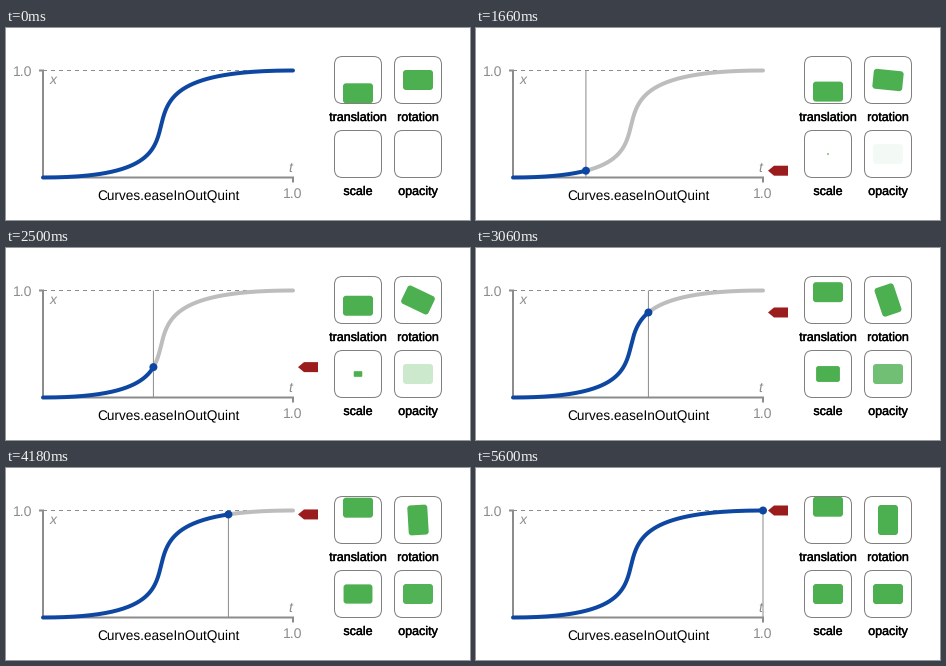
Write a matplotlib script that moves like this. It is 464 px wide and 192 px high and loops after 5620 ms.

```python
import matplotlib.pyplot as plt
import numpy as np
from matplotlib.animation import FuncAnimation
from matplotlib.patches import Circle, FancyBboxPatch, Polygon, Rectangle
from matplotlib.patheffects import Normal, Stroke
from matplotlib.transforms import Affine2D

W, H, DPI = 464, 192, 64
PT = 72 / DPI  # points per pixel
FRAMES, INTERVAL, STEPS = 281, 20, 120

LEFT, RIGHT, TOP, BOTTOM = 37, 287, 42.5, 149.5
BLUE, PALE, AXIS = "#0d47a1", "#bdbdbd", "#8c8c8c"
GREEN, RED = "#4caf50", "#9b1c1c"

plt.rcParams["font.family"] = "Liberation Sans"
plt.rcParams["text.hinting"] = "none"

fig = plt.figure(figsize=(W / DPI, H / DPI), dpi=DPI, facecolor="white")
ax = fig.add_axes([0, 0, 1, 1])
ax.set(xlim=(0, W), ylim=(H, 0))
ax.axis("off")


# Cubic(0.86, 0, 0.07, 1), parametrised by s
def bezier(s):
    a, b, c = 3 * s * (1 - s) ** 2, 3 * s**2 * (1 - s), s**3
    return 0.86 * a + 0.07 * b + c, b + c


GRID = np.linspace(0, 1, 2001)
GRID_T = bezier(GRID)[0]


def to_stage(t, v):
    return LEFT + t * (RIGHT - LEFT), BOTTOM + v * (TOP - BOTTOM)


def curve_points(s0, s1):
    return to_stage(*bezier(np.linspace(s0, s1, 200)))


def line(xs, ys, color, width, z, **kw):
    kw = {"solid_capstyle": "butt", "snap": False, **kw}
    return ax.plot(xs, ys, color=color, lw=width * PT, zorder=z, **kw)[0]


def label(x, y, text, px, color="black", weight=0, **kw):
    item = ax.text(x, y, text, fontsize=px * PT, color=color,
                   va="baseline", **{"ha": "center", **kw})
    if weight:
        item.set_path_effects([Stroke(linewidth=weight * PT, foreground=color), Normal()])


def rounded(x, y, w, h, r, z, **kw):
    box = FancyBboxPatch((x, y), w, h, zorder=z, snap=False,
                         boxstyle=f"round,pad=0,rounding_size={r}", **kw)
    return ax.add_patch(box)


def tile(cx, cy, name):
    rounded(cx - 23.5, cy - 23.5, 47, 47, 8, 5, fc="none", ec="#808080", lw=PT)
    label(cx, cy + 41, name, 12.5, weight=0.4)
    return rounded(cx - 15, cy - 10, 30, 20, 3, 4, fc=GREEN, ec="none")


# Graph
line([LEFT - 4, LEFT, LEFT], [TOP, TOP, BOTTOM], AXIS, 2, 1, solid_joinstyle="miter")
line([LEFT - 1, RIGHT, RIGHT], [BOTTOM, BOTTOM, BOTTOM + 5], AXIS, 2, 1,
     solid_joinstyle="miter")
for x in range(LEFT, RIGHT, 8):
    line([x, min(x + 4, RIGHT)], [TOP, TOP], AXIS, 1, 1)

label(26.5, 48, "1.0", 14, AXIS, ha="right")
label(RIGHT, 170, "1.0", 14, AXIS)
label(47, 56, "x", 14, AXIS, style="italic")
label(284, 144, "t", 14, AXIS, style="italic")
label(162, 171.5, "Curves.easeInOutQuint", 13.6)

rest = line([], [], PALE, 4, 2, solid_capstyle="round")
done = line([], [], BLUE, 4, 3, solid_capstyle="round")
marker = line([], [], AXIS, 1, 4)
dot = ax.add_patch(Circle((LEFT, BOTTOM), 4, fc=BLUE, ec="none", zorder=6))
arrow = ax.add_patch(Polygon([(0, 0)] * 5, fc=RED, ec="none", zorder=6, snap=False))

# Tiles
mover = tile(352, 52, "translation")
spinner = tile(412, 52, "rotation")
scaler = tile(352, 126, "scale")
fader = tile(412, 126, "opacity")
mover.set_clip_path(Rectangle((328, 28), 48, 48, transform=ax.transData))


# Steps arrive unevenly: three in every seven ticks
def step_at(frame):
    if frame == 0:
        return 0
    cycle, tick = divmod(frame - 1, 7)
    return 3 * cycle + 1 + (tick >= 5) + (tick >= 6)


def update(frame):
    t = step_at(frame) / STEPS
    s = np.interp(t, GRID_T, GRID)
    v = bezier(s)[1]
    x, y = to_stage(t, v)
    running = t > 0

    done.set_data(*curve_points(0, s if running else 1))
    rest.set_data(*curve_points(s, 1))
    marker.set_data([x, x], [TOP, BOTTOM])
    dot.center = x, y
    arrow.set_xy([(292, y), (298, y - 5), (312, y - 5), (312, y + 5), (298, y + 5)])
    for part in (rest, marker, dot, arrow, scaler):
        part.set_visible(running)

    mover.set_y(55.3 - 26.6 * v)
    spinner.set_transform(Affine2D().rotate_deg_around(412, 52, 90 * v) + ax.transData)
    size = max(v, 1e-6)
    grow = Affine2D().translate(-352, -126).scale(size).translate(352, 126)
    scaler.set_transform(grow + ax.transData)
    fader.set_alpha(float(np.clip(v, 0, 1)))
    return rest, done, marker, dot, arrow, mover, spinner, scaler, fader


anim = FuncAnimation(fig, update, frames=FRAMES, interval=INTERVAL,
                     repeat=True, repeat_delay=0, blit=False)
plt.show()
```
